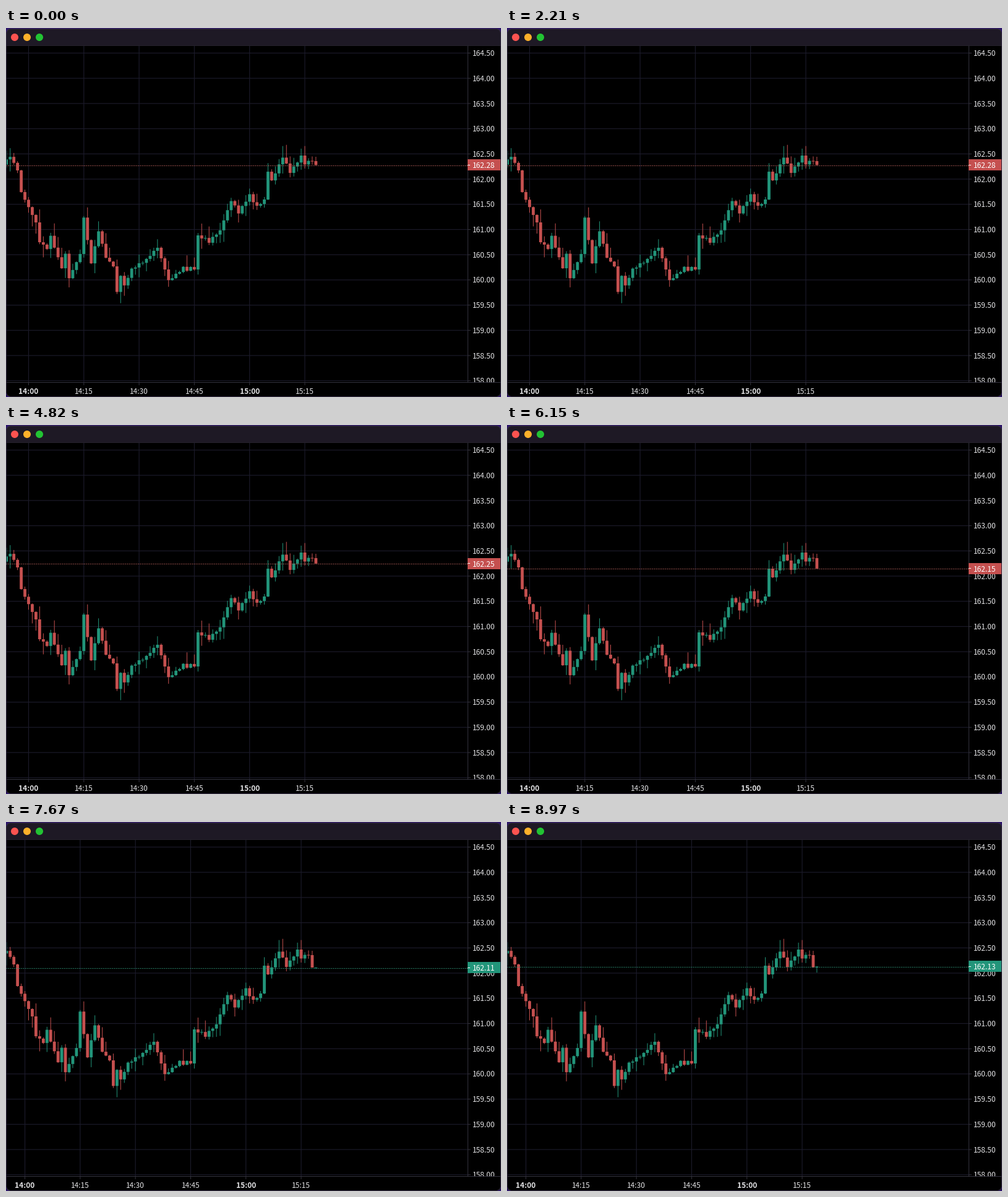
A matplotlib script that plays this animation: 800 px wide and 596 px high, repeating every 9000 ms.

```python
import matplotlib.pyplot as plt
import numpy as np
from matplotlib.animation import FuncAnimation
from matplotlib.collections import LineCollection, PolyCollection
from matplotlib.patches import Circle, FancyBboxPatch, Rectangle

W, H, DPI = 800, 596, 100
FRAMES, STEP = 300, 30
PX = 72 / DPI
RIGHT, BOTTOM = 746.5, 572.5
GAP, FIRST = 5.953, -6     # width of one minute, first bar before 14:00
GREEN, RED = "#22957a", "#c5504f"
GRID, BORDER, TEXT = "#1b1a29", "#33323d", "#e2e2e4"
FONT = "Noto Sans CJK JP"

# Turning points of the trend: minute after 14:00, height on the stage.
TURNS = [(-7, 220), (-5, 206), (-3, 230), (-2, 265), (2, 314), (3, 346),
         (5, 356), (6, 339), (9, 386), (10, 365), (11, 404), (14, 365),
         (15, 306), (17, 379), (19, 326), (21, 371), (23, 385), (24, 427),
         (25, 399), (26, 418), (28, 389), (32, 374), (35, 354), (38, 408),
         (42, 388), (45, 390), (46, 335), (49, 344), (52, 327), (55, 278),
         (57, 296), (60, 272), (62, 290), (64, 277), (65, 232), (66, 249),
         (69, 206), (71, 232), (74, 209), (75, 219), (77, 215)]

# Trades as (time in ms, price); a new bar starts at ROLL.
TICKS = [(0, 162.28), (2790, 162.34), (4200, 162.28), (4740, 162.25),
         (5310, 162.15), (6900, 162.11), (7950, 162.05), (8130, 162.01),
         (8280, 162.13)]
ROLL = 7620


def y_of(price):
    return 40.5 + (164.5 - price) * 81.42


def past_bars():
    """Finished bars as (open, close, high, low)."""
    rng = np.random.default_rng(5)
    minute = np.arange(FIRST - 1, 78)
    path = np.interp(minute, *zip(*TURNS))
    # small back-and-forth that fades where the trend is steep
    path -= 4 * np.cos(np.pi * minute) * np.exp(-abs(np.gradient(path)) / 4)
    path[-1] = TURNS[-1][1]
    o, c = path[:-1], path[1:]
    up, down = 1 + 20 * rng.random((2, len(c))) ** 2
    return list(zip(o, c, np.minimum(o, c) - up, np.maximum(o, c) + down))


fig = plt.figure(figsize=(W / DPI, H / DPI), dpi=DPI, facecolor="#2c146a")
ax = fig.add_axes([0, 0, 1, 1])
ax.set(xlim=(0, W), ylim=(H, 0))
ax.axis("off")


def rect(x, y, w, h, color, z):
    return ax.add_patch(Rectangle((x, y), w, h, fc=color, ec="none", zorder=z))


def rounded(y, h, z, **style):
    box = FancyBboxPatch((0.5, y), W - 1, h, zorder=z, lw=PX,
                         boxstyle="round,pad=0,rounding_size=8", **style)
    return ax.add_patch(box)


def line(xs, ys, color, z, width=1.0):
    return ax.plot(xs, ys, color=color, lw=width * PX, zorder=z, snap=False,
                   solid_capstyle="butt")[0]


def label(x, y, s, color=TEXT, z=6, **kw):
    return ax.text(x, y + 4.6, s, fontsize=12 * PX, color=color, zorder=z,
                   va="baseline", family=FONT, **kw)


# window
rounded(1.5, H - 2, 0, fc="black", ec="none")
rounded(1.5, 45, 1, fc="#1e1925", ec="none")
rect(1, 28, W - 2, 30, "black", 2)
rounded(1.5, H - 2, 12, fc="none", ec="#352c44")
line([0, W], [28.5, 28.5], "#25222c", 3)
for x, color in ((14, "#fc5350"), (34, "#fdb02a"), (54, "#22c333")):
    ax.add_patch(Circle((x, 15), 6, fc=color, ec="none", zorder=3))

# price axis
for price in np.arange(164.5, 157.9, -0.5):
    y = y_of(price)
    line([1, RIGHT], [y, y], GRID, 3, 1.2)
    line([RIGHT, 751], [y, y], BORDER, 3)
    label(754, y, f"{price:.2f}", z=4)
rect(1, 572, W - 2, 22, "black", 5)
line([RIGHT, RIGHT], [29, BOTTOM], BORDER, 5)
line([1, W - 1], [BOTTOM, BOTTOM], BORDER, 6)

# time axis
marks = []
for m in range(0, 90, 15):
    name = f"{14 + m // 60}:{m % 60:02d}"
    marks.append((m, line([0, 0], [29, BOTTOM], GRID, 3, 1.2),
                  line([0, 0], [BOTTOM, 577], BORDER, 6),
                  label(0, 586.7, name, ha="center",
                        weight="normal" if m % 60 else "bold")))

# bars and last price
wicks = LineCollection([], linewidths=PX, snap=False, zorder=7)
bodies = PolyCollection([], edgecolors="none", snap=False, zorder=8)
ax.add_collection(wicks, autolim=False)
ax.add_collection(bodies, autolim=False)
dots = ax.plot([], [], lw=PX, ls=(0, (1.5, 1.5)), zorder=9)[0]
badge = rect(746, 0, 53, 18, RED, 9)
notch = line([746, 750], [0, 0], "white", 10)
quote = label(754, 0, "", color="white", z=10)

HISTORY = past_bars()


def live_bars(t):
    """Bars still forming, with their extremes so far."""
    seen = [(s, y_of(p)) for s, p in TICKS if s <= t]
    before = [y for s, y in seen if s < ROLL]
    bars = [(HISTORY[-1][1], before[-1], 208, max(before + [222]))]
    if t >= ROLL:
        start = before[-1]
        after = [start] + [y for s, y in seen if s >= ROLL]
        bars.append((start, after[-1], min(after), max(after)))
    return bars


def update(n):
    t = n * STEP
    x0 = 36.5 - (GAP if t >= ROLL else 0)
    for m, grid, tick, text in marks:
        x = x0 + m * GAP
        grid.set_xdata([x, x])
        tick.set_xdata([x, x])
        text.set_x(x)

    segs, boxes, colors = [], [], []
    for i, (o, c, hi, lo) in enumerate(HISTORY + live_bars(t)):
        x = x0 + (i + FIRST) * GAP
        l, r = x - 2.4, x + 2.4
        top, bot = min(o, c), max(o, c, min(o, c) + 1)
        segs.append([(x, hi), (x, lo)])
        boxes.append([(l, top), (r, top), (r, bot), (l, bot)])
        colors.append(GREEN if c <= o else RED)
    wicks.set_segments(segs)
    wicks.set_color(colors)
    bodies.set_verts(boxes)
    bodies.set_facecolor(colors)

    price = [p for s, p in TICKS if s <= t][-1]
    y = y_of(price)
    row = np.floor(y) + 0.5
    dots.set_data([0, RIGHT], [row, row])
    dots.set_color("#2f9478" if colors[-1] == GREEN else "#b55f5a")
    badge.set_y(round(y) - 9)
    badge.set_facecolor(colors[-1])
    notch.set_ydata([row, row])
    quote.set_text(f"{price:.2f}")
    quote.set_y(round(y) + 4.6)
    return []


anim = FuncAnimation(fig, update, frames=FRAMES, interval=STEP, repeat=True,
                     repeat_delay=0, blit=False)
plt.show()
```
